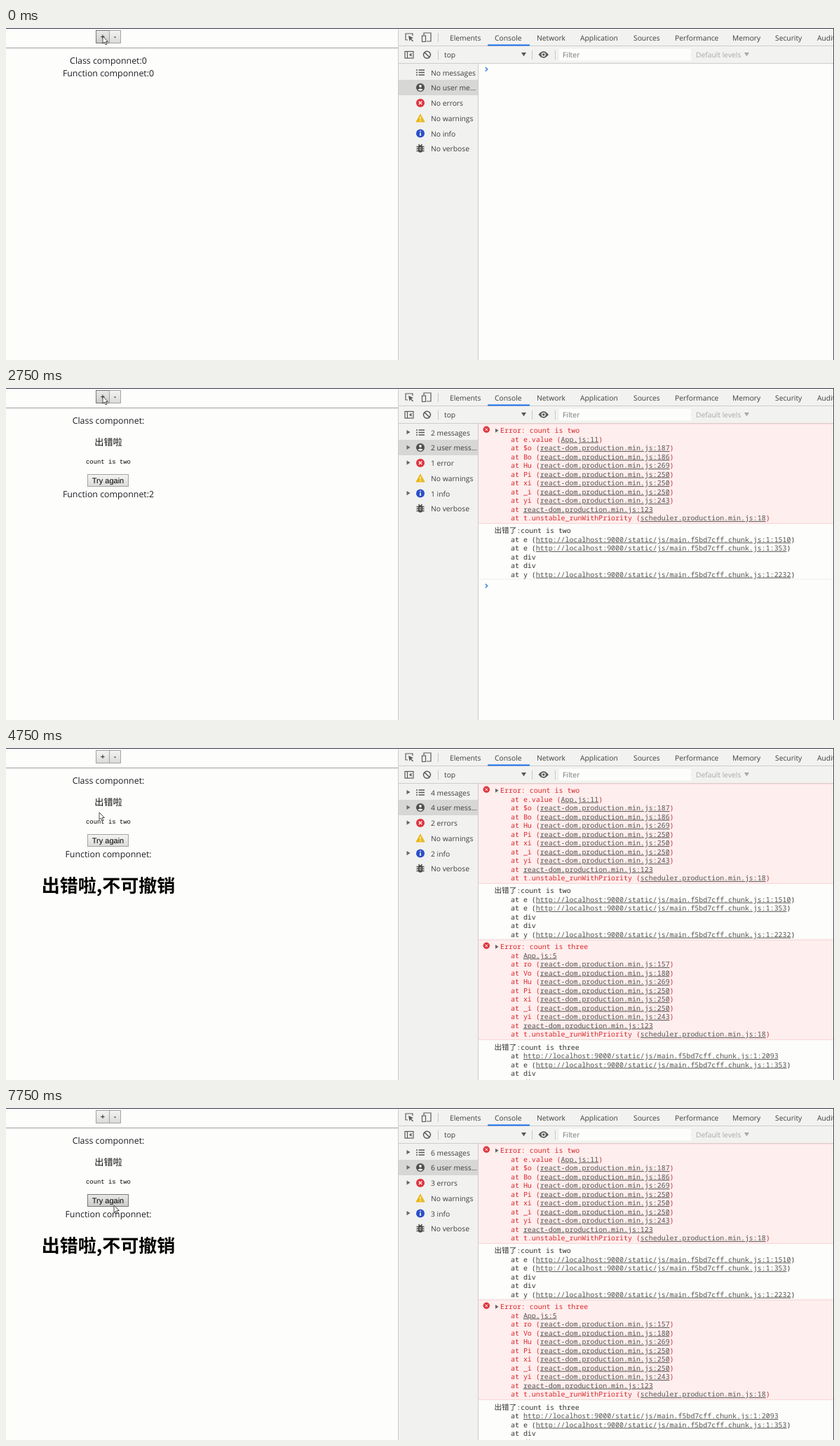
These frames come from a looping animation (1181 px wide and 474 px high, 8 s). An HTML page:

```html
<!DOCTYPE html>
<html lang="zh-CN">
<head>
<meta charset="utf-8">
<title>Error boundary demo</title>
<style>
  html, body { margin: 0; width: 100%; height: 100%; overflow: hidden; background: #fdfdfb; }
  svg { display: block; position: fixed; left: 0; top: 0; }
  text { font: 10.3px "Open Sans", "Noto Sans", sans-serif; fill: #3d3d3d; text-rendering: geometricPrecision; }
  .page { font-size: 12.4px; fill: #1c1e22; text-anchor: middle; }
  .cjk { font: 13.2px "Noto Sans CJK SC", "Noto Sans CJK", sans-serif; fill: #111; text-anchor: middle; }
  .big { font-size: 26px; font-weight: 700; fill: #000; }
  .pre { font: 8.9px "Liberation Mono", monospace; fill: #000; text-anchor: middle; }
  .btn { font: 11px "Liberation Sans", Arial, sans-serif; fill: #000; text-anchor: middle; }
  .log { font: 9.95px "Noto Sans Mono", "Noto Sans CJK SC", monospace; fill: #333; }
  .log.err { fill: #d9282c; }
  .log .han { font-size: 10.6px; font-family: "Noto Sans CJK SC", "Noto Sans CJK", sans-serif; }
  .link { fill: #555; text-decoration: underline; }
  .faint { fill: #a8a8a8; }
  .icon { fill: none; stroke: #5a5a5a; stroke-width: 1.2; }
</style>
</head>
<body>
<svg width="1181" height="474" viewBox="0 0 1181 474">
  <defs>
    <linearGradient id="face" x2="0" y2="1">
      <stop offset="0" stop-color="#f4f4f3"/><stop offset="1" stop-color="#dadad9"/>
    </linearGradient>
    <linearGradient id="hover" x2="0" y2="1">
      <stop offset="0" stop-color="#e9e9e8"/><stop offset="1" stop-color="#cbcbca"/>
    </linearGradient>
  </defs>
  <rect width="1181" height="474" fill="#fdfdfb"/>
  <path d="M0 28.5H559" stroke="#a0a0a0"/>
  <g id="page"></g>

  <rect x="560" y="1" width="620" height="49" fill="#f2f2f0"/>
  <rect x="560" y="50" width="113" height="424" fill="#f1f1ef"/>
  <rect x="560" y="74" width="113" height="22" fill="#d7d7d5"/>
  <path d="M560 25.5H1180M560 50.5H1180M559.5 1V474M673.5 51V474" stroke="#cdcdcb" fill="none"/>
  <path d="M616.5 7V20M616.5 32V45M750.5 32V45M783.5 32V45" stroke="#c8c8c6"/>
  <rect x="687" y="23.5" width="60" height="2" fill="#1a73e8"/>
  <g id="tabs"></g>

  <g class="icon">
    <path d="M573 17H570V8H580V11"/>
    <path d="M574 11L581 14L578 15.2L581 18.5L580 19.5L577 16.2L575.6 19Z" fill="#5a5a5a" stroke="none"/>
    <path d="M596 10V7H606V19H600"/><rect x="593.5" y="11" width="5" height="8.5"/>
    <rect x="569" y="33.5" width="12" height="9.5"/><path d="M572.5 33.5V43"/>
    <path d="M578.5 35.5L575 38.2L578.5 41Z" fill="#5a5a5a" stroke="none"/>
    <circle cx="600.5" cy="38.2" r="5" stroke-width="1.5"/><path d="M597 34.7L604 41.7" stroke-width="1.5"/>
  </g>
  <path d="M759.5 38Q766.5 28.5 774 38Q766.5 47.5 759.5 38Z" fill="#5a5a5a"/>
  <circle cx="766.7" cy="38" r="3.1" fill="#f2f2f0"/><circle cx="766.7" cy="38" r="1.8" fill="#5a5a5a"/>
  <rect x="789" y="29.5" width="188" height="17" fill="#fdfdfb"/>
  <text x="625" y="42">top</text>
  <path d="M735 35H742L738.5 40.5Z" fill="#5a5a5a"/>
  <text x="794" y="42" style="fill:#757575">Filter</text>
  <text x="984" y="42" class="faint">Default levels</text>
  <path d="M1053 35H1060L1056.5 40.5Z" fill="#a8a8a8"/>

  <g id="sidebar"></g>
  <g id="sideIcons">
    <path d="M588.5 60H597M588.5 63.5H597M588.5 67H597M585 60H587M585 63.5H587M585 67H587" stroke="#555" stroke-width="1.4"/>
    <circle cx="591" cy="85" r="6" fill="#4d4d4d"/>
    <circle cx="591" cy="83" r="1.9" fill="#f1f1ef"/><path d="M587.2 88Q591 84.8 594.8 88Q591 91.6 587.2 88Z" fill="#f1f1ef"/>
    <circle cx="591" cy="107" r="6" fill="#e0333b"/>
    <path d="M588.8 104.8L593.2 109.2M593.2 104.8L588.8 109.2" stroke="#fff" stroke-width="1.3"/>
    <path d="M591 123L597 134H585Z" fill="#e9b81c" stroke="#e9b81c" stroke-linejoin="round"/>
    <path d="M591 126.5V130.5M591 131.8V133.2" stroke="#fff" stroke-width="1.3"/>
    <circle cx="591" cy="150.5" r="6" fill="#2a50c8"/>
    <path d="M591 149.5V154M591 146.8V148.3" stroke="#fff" stroke-width="1.6"/>
    <rect x="587.8" y="167.3" width="6.4" height="10.4" rx="3.2" fill="#4d4d4d"/>
    <path d="M585.5 169.5H596.5M585.5 172.5H596.5M585.5 175.5H596.5M588.5 166L590 168M593.5 166L592 168" stroke="#4d4d4d" stroke-width="1.3"/>
    <path d="M589.7 171.2H592.3M589.7 173.8H592.3" stroke="#f1f1ef"/>
  </g>

  <g id="logs"></g>
  <path id="prompt" d="M-1.8 -2.8L1.2 0L-1.8 2.8" fill="none" stroke="#3b7ee0" stroke-width="1.5"/>
  <path d="M0 .5H1181" stroke="#34384a"/><path d="M1180.5 0V474" stroke="#4a4d58"/>
  <path id="arrow" d="M0 0V10.2L2.4 8.1L4.1 12L5.9 11.2L4.2 7.5H7.4Z" fill="#fff" stroke="#222" stroke-width=".8"/>
  <path id="beam" d="M-2 -5Q0 -5 0 -4V4Q0 5 -2 5M2 -5Q0 -5 0 -4M0 4Q0 5 2 5" fill="none" stroke="#222" stroke-width=".9"/>
</svg>
<script>
const LOOP = 8000;
const $ = id => document.getElementById(id);
const text = (x, y, cls, body) => `<text x="${x}" y="${y}" class="${cls}">${body}</text>`;
const link = s => `<tspan class="link">${s}</tspan>`;

// Each step changes only the listed values.
const steps = [
  { t: 0, cls: 0, fn: 0, messages: 0, errors: 0, info: 0, shown: 0, x: 138, y: 12 },
  { t: 500, cls: 1, fn: 1 },
  { t: 1250, cls: 2, fn: 2, messages: 1, errors: 1 },
  { t: 1500, messages: 2, info: 1, shown: 2 },
  { t: 3000, fn: 3, messages: 4, errors: 2, info: 2, shown: 4 },
  { t: 4250, x: 138, y: 24 },
  { t: 4500, x: 135, y: 58 },
  { t: 4750, x: 133, y: 92 },
  { t: 5000, x: 144, y: 130 },
  { t: 5250, cls: 0 },
  { t: 5500, x: 154, y: 48, beam: true },
  { t: 5750, x: 139, y: 13, beam: false },
  { t: 6500, cls: 1 },
  { t: 7000, cls: 2, messages: 6, errors: 3, info: 3 },
  { t: 7500, x: 150, y: 78 },
  { t: 7750, x: 154, y: 139 }
];

const tabs = { Elements: 633, Console: 697, Network: 757, Application: 819, Sources: 895,
  Performance: 954, Memory: 1036, Security: 1097, Audits: 1157 };
$('tabs').innerHTML = Object.entries(tabs).map(([name, x]) => text(x, 17.7, '', name)).join('');

function button(x, y, w, h, label, s) {
  const over = !s.beam && s.x >= x && s.x < x + w && s.y >= y && s.y < y + h;
  return `<rect x="${x + .5}" y="${y + .5}" width="${w - 1}" height="${h - 1}" fill="url(#${over ? 'hover' : 'face'})" stroke="${over ? '#777' : '#a3a3a3'}"/>`
    + text(x + w / 2, y + h / 2 + 3.8, 'btn', label);
}

function page(s) {
  const failed = s.cls > 1, dy = failed ? 87 : 0;
  let out = button(128, 3, 20, 19, '+', s) + button(147, 3, 17, 19, '-', s)
    + text(146, 50.6, 'page', 'Class componnet:' + (failed ? '' : s.cls));
  if (failed) out += text(146, 82, 'cjk', '出错啦') + text(146, 107.6, 'pre', 'count is two')
    + button(116, 123, 59, 18, 'Try again', s);
  out += text(146, 68.5 + dy, 'page', 'Function componnet:' + (s.fn > 2 ? '' : s.fn));
  if (s.fn > 2) out += text(146, 118.7 + dy, 'cjk big', '出错啦,不可撤销');
  return out;
}

function sidebar({ messages, errors, info }) {
  const plural = (n, word) => `${n || 'No'} ${word}${n === 1 ? '' : 's'}`;
  const rows = [
    [messages, plural(messages, 'message')],
    [messages, messages ? messages + ' user mess...' : 'No user me...'],
    [errors, plural(errors, 'error')],
    [0, 'No warnings'],
    [info, `${info || 'No'} info`],
    [0, 'No verbose']
  ];
  return rows.map(([count, label], i) => {
    const y = 63.4 + i * 21.75;
    return text(606, y + 4.1, '', label)
      + (count ? `<path d="M571.5 ${y - 3.5}L576.5 ${y - .3}L571.5 ${y + 2.9}Z" fill="#666"/>` : '');
  }).join('');
}

// Stack rows are [caller, location]; an empty caller leaves a bare link.
const dom = (name, line) => [name, 'react-dom.production.min.js:' + line];
const chunk = (name, pos) => [name, 'http://localhost:9000/static/js/main.f5bd7cff.chunk.js:1:' + pos];
const shared = [dom('Hu', 269), dom('Pi', 250), dom('xi', 250), dom('_i', 250), dom('yi', 243), dom('', 123),
  ['t.unstable_runWithPriority', 'scheduler.production.min.js:18']];
const entries = [
  { top: 51, error: 'two', rows: [['e.value', 'App.js:11'], dom('$o', 187), dom('Bo', 186), ...shared] },
  { top: 194, note: 'two', rows: [chunk('e', 1510), chunk('e', 353), ['div'], ['div'], chunk('y', 2232)] },
  { top: 274, error: 'three', rows: [['', 'App.js:5'], dom('ro', 157), dom('Vo', 180), ...shared] },
  { top: 417.5, note: 'three', rows: [chunk('', 2093), chunk('e', 353), ['div'], ['div']] }
];

function entry({ top, error, note, rows }) {
  const base = top + 13.1, height = rows.length * 12.5 + 17.5;
  const cls = error ? 'log err' : 'log';
  let out = error
    ? `<rect x="674" y="${top}" width="506" height="${height}" fill="#feeeed"/>
       <path d="M674 ${top + .2}H1180M674 ${top + height}H1180" stroke="#fad5d5"/>
       <circle cx="685.3" cy="${top + 8.3}" r="4.7" fill="#df343b"/>
       <path d="M683.5 ${top + 6.5}l3.6 3.6m0 -3.6l-3.6 3.6" stroke="#fff"/>
       <path d="M698 ${top + 6.7}l4.5 3l-4.5 3z" fill="#666"/>`
      + text(705, base, cls, 'Error: count is ' + error)
    : `<path d="M674 ${top + height - 1}H1180" stroke="#ededeb"/>`
      + text(696.5, base, cls, `<tspan class="han">出错了</tspan>:count is ${note}`);
  rows.forEach(([name, place], i) => {
    const body = !place ? name : name ? `${name} (${link(place)})` : link(place);
    out += text(720, base + 12.5 * (i + 1), cls, 'at ' + body);
  });
  return out;
}

function render(s) {
  $('page').innerHTML = page(s);
  $('sidebar').innerHTML = sidebar(s);
  $('logs').innerHTML = entries.slice(0, s.shown).map(entry).join('');
  $('prompt').setAttribute('transform', `translate(685.5 ${[59, 0, 282.5, 0, 520][s.shown]})`);
  for (const id of ['arrow', 'beam']) {
    $(id).setAttribute('transform', `translate(${s.x} ${s.y})`);
    $(id).style.display = (id === 'beam') === !!s.beam ? '' : 'none';
  }
}

const start = performance.now();
let last = -1;
function tick() {
  const t = (performance.now() - start) % LOOP;
  const past = steps.filter(s => s.t <= t);
  if (past.length !== last) {
    last = past.length;
    render(Object.assign({}, ...past));
  }
  requestAnimationFrame(tick);
}
tick();
</script>
</body>
</html>
```
